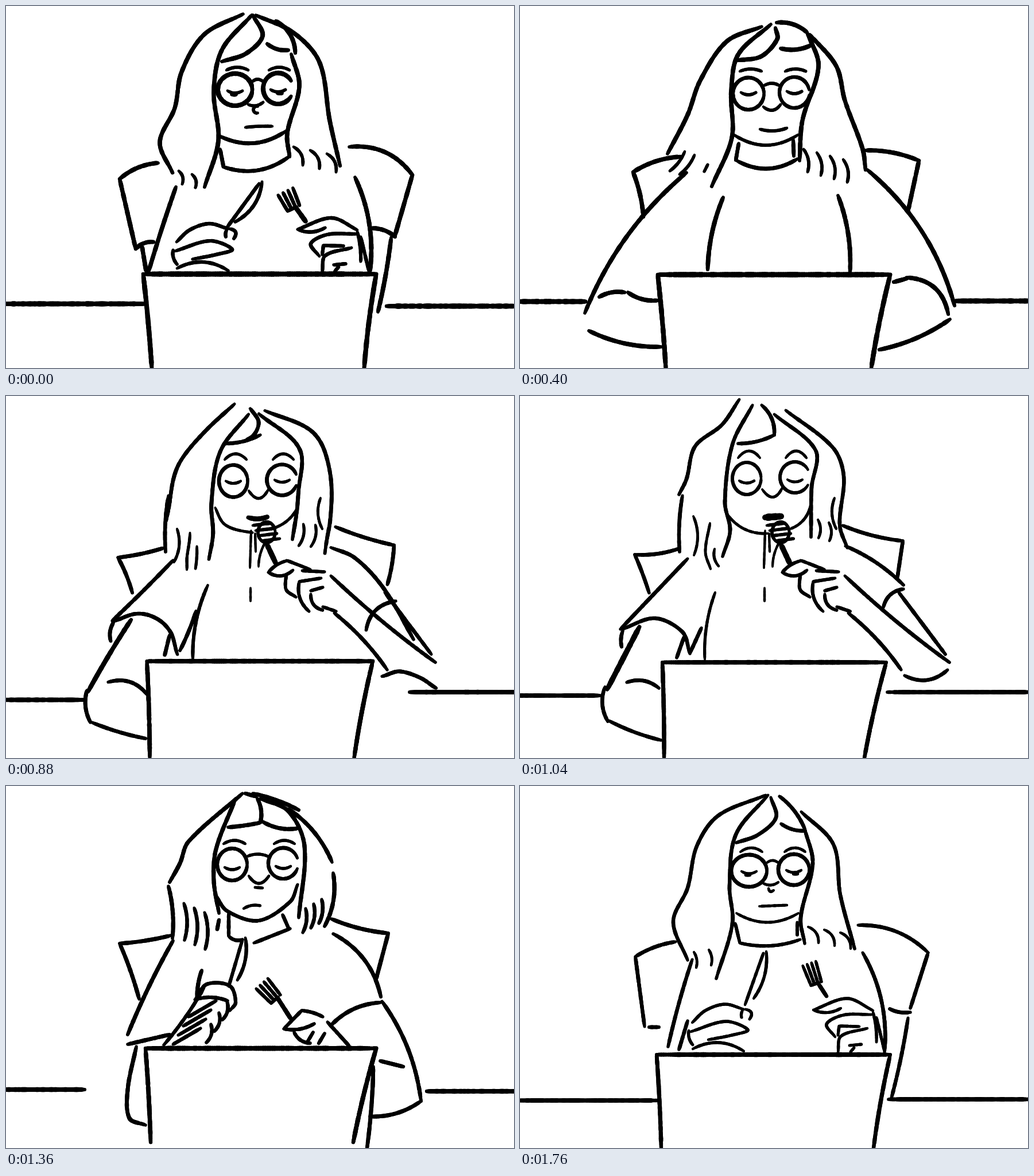
Animation of 885 by 632 pixels, one loop 1840 ms. Source, as an HTML page with a canvas:

```html
<!DOCTYPE html>
<html lang="en">
<head>
<meta charset="utf-8">
<title>Dinner at the laptop</title>
<style>
html, body { margin: 0; width: 100%; height: 100%; overflow: hidden; background: #fff; }
canvas { display: block; }
</style>
</head>
<body>
<canvas id="stage" width="885" height="632"></canvas>
<script>
const W = 885, H = 632, STEP = 80, STEPS = 23, SAMPLES = 100;
const ctx = document.getElementById('stage').getContext('2d');
const poses = [];
const mix = (a, b, k) => a + (b - a) * k;

// Smooth path through points, evenly paced; returns u in 0..1 -> [x, y].
function spline(v) {
  const p = [];
  for (let i = 0; i < v.length; i += 2) p.push([v[i], v[i + 1]]);
  const last = p.length - 1;
  const d = p.slice(1).map((q, i) => Math.hypot(q[0] - p[i][0], q[1] - p[i][1]));
  const total = d.reduce((a, b) => a + b, 0);
  const slope = (i, c) => {
    const a = Math.max(i - 1, 0), b = Math.min(i + 1, last);
    return (p[b][c] - p[a][c]) / ((i > 0 ? d[a] : 0) + (i < last ? d[i] : 0));
  };
  return u => {
    let i = 0, s = u * total;
    while (i < last - 1 && s > d[i]) s -= d[i++];
    const t = s / d[i], t2 = t * t, t3 = t2 * t;
    return [0, 1].map(c =>
      (2 * t3 - 3 * t2 + 1) * p[i][c] + (t3 - 2 * t2 + t) * d[i] * slope(i, c) +
      (3 * t2 - 2 * t3) * p[i + 1][c] + (t3 - t2) * d[i] * slope(i + 1, c));
  };
}

// One drawing: named strokes, so that equal names can blend between drawings.
class Sketch {
  constructor(step, pen) {
    Object.assign(this, { step, pen, width: pen, strokes: {} });
    poses.push(this);
  }
  weight(k) { this.width = this.pen * k; return this; }
  put(name, at) {
    const pts = Array.from({ length: SAMPLES + 1 }, (_, i) => at(i / SAMPLES));
    this.strokes[name] = { width: this.width, pts };
    return this;
  }
  curve(name, ...v) { return this.put(name, spline(v)); }

  // Positive bulge lies right-hand of the direction of travel.
  bow(name, x0, y0, x1, y1, bulge = 0) {
    const dx = x1 - x0, dy = y1 - y0, k = 4 * bulge / Math.hypot(dx, dy);
    return this.put(name, u => {
      const b = k * u * (1 - u);
      return [x0 + dx * u - dy * b, y0 + dy * u + dx * b];
    });
  }
  oval(name, x, y, rx, ry, gap = 0) {
    return this.put(name, u => {
      const a = (gap / 2 + (360 - gap) * u) * Math.PI / 180;
      return [x + rx * Math.cos(a), y + ry * Math.sin(a)];
    });
  }
  // A row of equal strokes: locks of hair, fingers.
  comb(name, count, x, y, dx, dy, lean, drop, bulge = 0) {
    for (let i = 0; i < count; i++) {
      const cx = x + i * dx, cy = y + i * dy;
      this.bow(name + i, cx, cy, cx + lean, cy + drop, bulge);
    }
    return this;
  }

  face({ y, lid, lx, rx, rl, rr, brow, arch, gap = 0, bridge = true, pupils = false, rim = 1 }) {
    this.weight(rim).oval('lensL', lx, y, rl, 28).oval('lensR', rx, y - 2, rr, 27, gap);
    this.weight(0.75);
    if (bridge) this.bow('bridge', lx + rl, y - 14, rx - rr, y - 14, -4);
    this.bow('browL', lx - 15, brow, lx + 23, brow, -arch);
    this.bow('browR', rx - 16, brow, rx + 20, brow, -arch);
    this.bow('eyeL', lx - 13, lid, lx + 13, lid, 4).bow('eyeR', rx - 13, lid - 2, rx + 13, lid - 2, 4);
    if (pupils) {
      this.weight(1.1).bow('pupilL', lx - 5, lid + 6, lx + 1, lid + 6).bow('pupilR', rx, lid + 4, rx + 6, lid + 4);
    }
    return this.weight(0.75);
  }
  neck(x, y, x0, y0, x1, y1, sag) {
    return this.weight(0.9).bow('neckL', x, y, x0, y0).bow('collar', x0, y0, x1, y1, sag);
  }
  chair(side, x0, y0, x1, y1, x2, y2, top = 0, edge = 0) {
    return this.weight(1).bow('chair' + side, x0, y0, x1, y1, top).bow('edge' + side, x1, y1, x2, y2, edge);
  }
  laptop(y, x0, x1, b0, b1, floor = H) {
    return this.weight(1.2).bow('lapTop', x0, y, x1, y).weight(1.1)
      .bow('lapL', x0, y, b0, floor, -1).bow('lapR', x1, y, b1, floor, 2).weight(1);
  }
  desk(x0, y0, x1, y1) {
    return this.weight(1.15).bow('deskL', -8, y0, x0, y0).bow('deskR', x1, y1, W + 8, y1).weight(1);
  }
  knife(hx, hy, tx, ty, belly) {
    return this.weight(0.85).bow('knife', hx, hy, tx, ty)
      .bow('blade', tx + 5, ty - 3, hx + 15, hy - 11, -belly);
  }
  fork(tx, ty, bx, by, hx, hy, gap) {
    const len = Math.hypot(bx - tx, by - ty);
    const nx = (by - ty) / len * gap, ny = (tx - bx) / len * gap;
    this.weight(0.85);
    for (let i = 0; i < 4; i++) {
      const k = i - 1.5;
      this.bow('tine' + i, tx + nx * k, ty + ny * k, bx + nx * k * 0.8, by + ny * k * 0.8);
    }
    this.bow('tineBase', bx - nx * 1.2, by - ny * 1.2, bx + nx * 0.6, by + ny * 0.6);
    return this.weight(1.1).bow('fork', bx + nx * 0.4, by + ny * 0.4, hx, hy);
  }
  // Both hands closed around the cutlery.
  grip(dx, dy) {
    const move = v => v.map((n, i) => n + (i % 2 ? dy : dx));
    const c = (name, ...v) => this.curve(name, ...move(v));
    const b = (name, bulge, ...v) => this.bow(name, ...move(v), bulge);
    this.weight(0.82);
    c('backL', 297,412, 320,391, 354,380, 387,389);
    b('thumbL', -7, 390,389, 397,406);
    b('nailL', 1, 384,392, 383,403);
    c('fingerL', 294,428, 356,410, 394,425, 366,434, 325,442);
    b('heelL', 3, 291,426, 298,451);
    b('palmL', -13, 298,458, 387,462);
    c('backR', 508,390, 567,370, 612,391);
    b('thumbR', 6, 508,390, 556,387);
    c('fingerR', 546,437, 531,415, 560,399, 610,398);
    b('knuckleR', 0, 553,418, 588,419);
    b('jointR', 0, 551,434, 553,418);
    c('palmR', 551,464, 556,436, 602,422);
    b('heelR', -2, 612,394, 618,446);
    b('wristLine', 0, 618,403, 632,462);
    b('ring', 0, 571,452, 592,450);
    b('ringEnd', 0, 573,463, 579,456);
    return this;
  }
}

new Sketch(0, 7.5)
  .curve('hairL', 413,14, 345,50, 306,115, 294,178, 268,238, 290,291)
  .curve('partL', 428,16, 376,77, 362,150, 370,235, 346,316)
  .curve('fringe', 430,16, 447,52, 418,83, 376,97).bow('fringeR', 455,66, 492,77, 4)
  .curve('hairR', 435,16, 500,46, 546,98, 564,200, 582,279).bow('partR', 470,26, 504,82, -9)
  .curve('faceR', 497,84, 511,140, 490,222, 494,263)
  .face({ y: 146, lid: 148, lx: 399, rx: 474, rl: 30, rr: 26, brow: 112, arch: 5, gap: 60, pupils: true, rim: 1.05 })
  .bow('nose', 422,172, 448,168, 4).oval('septum', 437, 181, 6, 6, 150).bow('mouth', 417,212, 464,210, -1)
  .comb('lockL', 2, 301, 288, 23, 6, 6, 23, -4).comb('lockR', 3, 501, 246, 29, 6, 16, 32, -6)
  .weight(0.9).bow('jaw', 372,227, 488,218, 17).neck(373, 250, 379, 281, 493, 263, 15)
  .chair('L', 265, 274, 198, 302, 226, 424, 6).chair('R', 598, 246, 708, 295, 677, 403, -17)
  .bow('armL', 296,316, 248,465, 1).bow('armR', 608,299, 634,465, -12)
  .bow('cuffL', 226,424, 257,412, -4).bow('cuffR', 678,403, 638,388, 4)
  .bow('foreL', 237,420, 244,462).bow('foreR', 671,404, 648,534, -2)
  .laptop(468, 239, 645, 254, 624).desk(244, 520, 663, 524)
  .grip(0, 0).knife(384, 388, 441, 310, 11).fork(487, 324, 501, 353, 522, 376, 9.5);

new Sketch(5, 7.5)
  .curve('hairL', 421,36, 360,62, 314,130, 292,190, 257,258)
  .curve('partL', 437,32, 380,85, 368,150, 369,230, 334,315)
  .curve('fringe', 445,38, 448,58, 420,88, 378,95).bow('fringeR', 454,74, 508,68, 5)
  .bow('partR', 447,29, 500,46, -6)
  .curve('faceR', 500,46, 520,105, 492,200, 487,270)
  .curve('hairR', 505,50, 551,105, 566,165, 597,250, 602,286)
  .face({ y: 153, lid: 151, lx: 398, rx: 478, rl: 27, rr: 26, brow: 114, arch: 4, gap: 20, rim: 0.85 })
  .bow('nose', 424,176, 454,172, 8).bow('mouth', 418,215, 465,213, 4).bow('jaw', 373,225, 484,225, 18)
  .comb('lockL', 2, 287, 254, 17, 6, -26, 34, -3).bow('wisp', 327,277, 321,289)
  .comb('lockR', 4, 494, 250, 23, 6, 7, 40, -5)
  .neck(381, 240, 376, 269, 483, 267, 16).bow('neckR', 476,234, 477,262)
  .chair('L', 282, 263, 197, 290, 215, 368, 6, -3).chair('R', 603, 252, 695, 270, 676, 358, -5)
  .bow('armL', 290,291, 113,536, 19).bow('armR', 605,286, 757,523, -22)
  .bow('torsoL', 354,334, 327,460, 6).bow('torsoR', 554,331, 575,463, -7)
  .bow('elbowL', 138,508, 182,500, -4).bow('wristL', 188,500, 240,514, 5).bow('underL', 120,567, 246,595, 8)
  .bow('wristR', 651,482, 673,476).bow('elbowR', 673,474, 746,538, -19).bow('underR', 749,547, 626,600, -7)
  .laptop(469, 240, 645, 254, 612).desk(114, 516, 758, 515);

new Sketch(9, 7)
  .bow('crown', 412,19, 428,23)
  .curve('hairL', 414,22, 345,70, 302,140, 283,195, 276,283)
  .curve('partL', 440,48, 377,105, 359,190, 354,290)
  .curve('fringe', 430,28, 446,58, 425,85, 390,89).bow('fringeR', 452,66, 497,79, 6)
  .curve('faceR', 438,30, 508,90, 509,190, 491,255)
  .curve('hairR', 439,26, 535,48, 563,120, 572,225, 541,284)
  .face({ y: 153, lid: 149, lx: 397, rx: 483, rl: 25, rr: 27, brow: 114, arch: 8, gap: 25 })
  .bow('nose', 424,168, 456,168, 13).bow('septum', 437,186, 444,186).bow('noseSide', 430,148, 427,160)
  .bow('mouth', 417,212, 456,212, 6).curve('jaw', 369,185, 378,220, 427,237).bow('jawR', 441,235, 507,204, 7)
  .comb('lockL', 4, 294, 254, 16, 2, -12, 48, -6).comb('lockR', 2, 517, 231, 23, -2, -17, 44, -5)
  .bow('shoulder', 358,255, 380,244).bow('nape', 484,240, 495,241)
  .neck(386, 230, 379, 255, 486, 252, 25).bow('neckR', 476,228, 480,246)
  .chair('L', 270, 265, 190, 287, 215, 343, 0, -3).chair('R', 586, 231, 685, 268, 672, 338, 1, -4)
  .bow('armL', 290,290, 195,378, -2).curve('armR', 565,267, 625,292, 690,375, 752,520)
  .curve('cuffL', 193,381, 235,370, 280,393, 301,452).bow('cuffR', 690,379, 622,448, 18)
  .bow('hemL', 195,382, 188,418, 5).bow('hemR', 675,345, 711,403, -3)
  .bow('torsoL', 363,318, 329,458, 9).bow('torsoR', 547,319, 556,456, -6)
  .bow('sleeveL', 346,346, 310,440, -3).bow('foldL', 284,415, 280,448).bow('sleeveR', 572,406, 623,451, 3)
  .bow('foreL', 228,378, 134,520, 3).bow('elbowL', 134,520, 141,571, 4).bow('underL', 145,573, 241,595, 2)
  .bow('wristL', 170,499, 250,533, -16).bow('wristR', 628,444, 655,476)
  .curve('elbowR', 640,491, 678,466, 725,490, 754,542).bow('underR', 750,540, 630,593, -9)
  .laptop(461, 243, 640, 250, 613).desk(131, 538, 766, 517);

new Sketch(13, 6.5)
  .curve('hairL', 382,6, 352,50, 305,88, 290,145, 277,172).bow('hairL2', 283,174, 278,272, 3)
  .curve('partL', 405,16, 370,85, 357,185, 366,235, 353,280)
  .bow('fringe', 421,16, 443,68, -7).bow('fringeEnd', 443,68, 380,83, -4)
  .curve('faceR', 443,32, 515,95, 508,160, 507,246)
  .curve('hairR', 463,25, 545,90, 564,140, 557,225, 570,265)
  .face({ y: 144, lid: 148, lx: 395, rx: 479, rl: 25, rr: 26, brow: 108, arch: 12, gap: 60, bridge: false, rim: 0.9 })
  .bow('nose', 422,163, 457,160, 15).bow('jaw', 360,205, 432,240, 11).bow('jawR', 471,232, 506,192, 7)
  .weight(1.8).bow('mouth', 427,212, 455,210)
  .weight(0.85).oval('bite', 454, 238, 15, 18).comb('bar', 4, 430, 226, 5, 9, 32, -4)
  .weight(1.4).bow('fork', 455,260, 470,292)
  .weight(0.65).bow('cloth', 427,235, 425,300).bow('clothSeam', 434,240, 435,272).bow('clothEdge', 452,255, 440,298, 3)
  .bow('button', 426,335, 426,358)
  .weight(0.75).bow('lockL0', 302,210, 303,278, -7).curve('lockL1', 331,222, 323,272, 332,302).bow('lockL2', 339,267, 346,297, 4)
  .comb('lockR', 2, 519, 216, 19, 5, 1, 32, -4).bow('lockR2', 548,178, 551,232, 6)
  .weight(0.9).bow('thumbTop', 457,308, 488,288, -3).bow('thumbLow', 457,308, 500,304, 8)
  .bow('index', 489,287, 530,303).bow('knuckle', 516,305, 555,307)
  .curve('finger0', 488,312, 488,338, 505,351).bow('finger1', 549,318, 511,324).bow('finger2', 511,324, 528,376, 8)
  .bow('finger3', 552,334, 531,340).bow('finger4', 531,346, 552,374, 7).bow('finger5', 552,368, 575,376)
  .chair('L', 278, 266, 200, 277, 225, 344, -4, -1).chair('R', 562, 226, 667, 253, 657, 320, 4)
  .bow('armL', 292,284, 175,407).bow('armR', 567,262, 668,330, -6)
  .curve('cuffL', 178,407, 235,388, 283,412, 296,450).bow('cuffR', 668,337, 633,369, 8)
  .bow('hemL', 179,410, 177,438, 2).bow('foldL', 286,420, 273,457).bow('sleeveL', 316,405, 296,449)
  .weight(0.8).bow('torsoL', 340,343, 322,460, 6)
  .weight(1.4).bow('foreL', 208,403, 152,512)
  .weight(1).bow('elbowL', 148,508, 153,568, 7).bow('underL', 155,567, 246,601, 3).bow('wristL', 186,500, 242,510, -8)
  .bow('foreR', 660,343, 741,451).bow('wristTop', 566,314, 748,465, 4).bow('wristLow', 572,379, 664,478, -5)
  .bow('elbowR', 670,488, 745,478, 13)
  .laptop(465, 248, 638, 251, 600).desk(140, 523, 640, 517);

new Sketch(17, 7)
  .bow('crown', 417,13, 435,18)
  .curve('hairL', 412,13, 318,97, 303,135, 285,168).bow('hairL2', 283,175, 290,266, -4)
  .curve('partL', 400,22, 366,110, 362,165, 371,222).bow('lock', 371,234, 368,250)
  .bow('fringe', 438,22, 443,64, -4).bow('fringeEnd', 443,64, 387,72, -1).bow('fringeR', 445,61, 508,74, 6)
  .bow('partR', 430,13, 510,42, -3)
  .curve('faceR', 443,22, 492,44, 520,105, 510,230)
  .bow('hairR', 492,40, 568,133, -9).bow('hairR2', 570,152, 555,245, -8)
  .face({ y: 137, lid: 142, lx: 394, rx: 483, rl: 26, rr: 26, brow: 101, arch: 6, gap: 40, rim: 0.9 })
  .bow('nose', 423,157, 458,157, 13).bow('septum', 434,177, 447,178).bow('mouth', 414,214, 443,209, -3)
  .weight(0.9).curve('jaw', 365,190, 385,218, 440,235, 495,202, 508,172)
  .comb('lockL', 3, 310, 205, 18, 8, 1, 64, -5).comb('lockR', 3, 522, 214, 14, -8, -5, 42, -4)
  .neck(388, 222, 388, 262, 412, 268, 4).bow('collarR', 432,274, 495,249).bow('neckR', 482,225, 493,250)
  .chair('L', 287, 261, 198, 275, 232, 372, -2, -2).chair('R', 567, 232, 666, 257, 644, 340, 4)
  .bow('armL', 291,270, 212,434, 3).bow('armR', 570,258, 653,368, -16)
  .bow('cuffL', 212,451, 285,434).bow('cuffR', 652,378, 567,417, 9)
  .curve('foreL', 227,455, 212,530, 215,580, 243,592).bow('foreR', 655,376, 723,550, -12)
  .bow('underR', 723,550, 634,577, -8).bow('wristR', 652,480, 692,490).bow('torsoL', 341,322, 333,368, 2)
  .knife(388, 350, 412, 268, 7).fork(446, 345, 470, 372, 496, 406, 9)
  .weight(0.9).curve('backL', 330,372, 350,346, 390,349, 400,378, 390,392).bow('heelL', 345,352, 275,452, -3)
  .bow('fingerL', 329,373, 386,375, -5)
  .comb('finger', 4, 366, 375, -9, 16, -48, 28).comb('hook', 3, 385, 376, -14, 20, -8, 32, -5)
  .bow('thumbTop', 484,424, 515,392).bow('index', 515,392, 552,403, -2).bow('thumbR', 484,424, 537,415, 5)
  .bow('fingerR', 502,430, 530,449, 5).comb('knuckleR', 2, 535, 430, 20, 2, -10, 17).bow('heelR', 560,412, 598,454)
  .laptop(458, 243, 645, 252, 605, 622).bow('lapEdge', 640,490, 629,H, -2).desk(137, 530, 733, 533);

new Sketch(19, 7)
  .curve('hairL', 425,18, 350,48, 320,115, 310,175, 292,225, 296,258)
  .curve('partL', 415,25, 366,95, 378,195, 367,243)
  .bow('fringe', 428,24, 446,65, -9).bow('fringeEnd', 446,65, 377,79, -5).bow('fringeR', 455,62, 498,62)
  .curve('faceR', 432,25, 505,65, 512,180, 518,236)
  .curve('hairR', 430,22, 490,28, 553,85, 570,170, 569,237)
  .face({ y: 138, lid: 140, lx: 393, rx: 484, rl: 24, rr: 28, brow: 98, arch: 6 })
  .bow('nose', 422,152, 453,148, 17).bow('noseSide', 426,135, 424,146).bow('mouth', 446,208, 471,209)
  .weight(0.9).bow('jaw', 381,205, 508,203, 31).bow('nape', 490,232, 512,230)
  .comb('lockL', 3, 317, 208, 17, -3, 4, 48, -4).comb('lockR', 2, 531, 160, 15, 22, -2, 72, -7)
  .neck(391, 224, 391, 256, 490, 242, 12).bow('neckR', 482,224, 490,244)
  .chair('L', 280, 265, 190, 285, 222, 403, 4, -8).chair('R', 595, 243, 683, 280, 658, 420, 2, 4)
  .bow('armL', 280,268, 214,430, -9).bow('armR', 565,240, 645,382, -16)
  .bow('cuffL', 214,430, 270,436, 1).bow('cuffR', 645,382, 595,384)
  .bow('foreL', 224,440, 229,592, 5).bow('foreR', 633,385, 660,580, -14).bow('underR', 660,583, 618,582, -5)
  .bow('torsoL', 354,324, 335,392, 2)
  .laptop(464, 244, 640, 235, 600).bow('lapEdge', 640,472, 630,H, -3).bow('lapFold', 640,480, 658,580)
  .desk(220, 515, 674, 517)
  .grip(-2, 8).knife(370, 388, 422, 275, 12).fork(494, 297, 498, 344, 520, 385, 12);

new Sketch(22, 6.5)
  .curve('hairL', 428,16, 345,52, 308,105, 292,178, 267,237, 292,304)
  .curve('partL', 432,16, 376,85, 365,175, 370,240, 342,336)
  .curve('fringe', 437,20, 446,55, 415,85, 377,99).bow('fringeR', 455,66, 497,78, 4)
  .bow('partR', 452,18, 496,75, -5).curve('faceR', 496,75, 510,135, 489,230, 496,275)
  .curve('hairR', 490,45, 546,102, 558,190, 583,284)
  .face({ y: 148, lid: 149, lx: 399, rx: 477, rl: 31, rr: 27, brow: 115, arch: 7, pupils: true })
  .bow('nose', 424,170, 450,168, 4).bow('septum', 433,179, 442,182, 4).bow('mouth', 417,210, 465,208)
  .bow('jaw', 377,222, 485,222, 16)
  .comb('lockL', 2, 303, 290, 26, -4, 4, 27, -3).comb('lockR', 3, 502, 246, 28, 5, 18, 28, -6)
  .neck(375, 240, 383, 274, 488, 268, 8).bow('neckR', 483,238, 483,260)
  .chair('L', 271, 272, 201, 298, 217, 420, 4).chair('R', 589, 243, 711, 291, 680, 388, -14)
  .bow('armL', 300,303, 258,455, 2).bow('armR', 597,291, 635,465, -14)
  .bow('cuffL', 225,421, 242,421).bow('cuffR', 680,395, 644,389, -3)
  .bow('foldL', 292,410, 277,460).bow('foreR', 676,405, 647,545, -2)
  .laptop(469, 238, 645, 246, 616).desk(243, 549, 642, 547)
  .grip(3, 1).knife(392, 382, 424, 292, 8).fork(504, 310, 516, 345, 534, 367, 8);

function blend(a, b, k) {
  if (!a || !b) return k < 0.5 ? a : b;
  return {
    width: mix(a.width, b.width, k),
    pts: a.pts.map((p, i) => [mix(p[0], b.pts[i][0], k), mix(p[1], b.pts[i][1], k)])
  };
}

// Rough brush: slightly tapered ends and seeded grain.
function brush({ width, pts }, seed) {
  const rand = () => (seed = (seed * 16807) % 2147483647) / 2147483647 - 0.5;
  let length = 0;
  for (let i = 1; i <= SAMPLES; i++) length += Math.hypot(pts[i][0] - pts[i - 1][0], pts[i][1] - pts[i - 1][1]);
  const stride = Math.max(1, Math.round(2.5 * SAMPLES / length));
  for (let i = 0; i < SAMPLES; i += stride) {
    const j = Math.min(i + stride, SAMPLES);
    const body = Math.min(1, Math.sin(Math.PI * (i + j) / 2 / SAMPLES) * 4);
    ctx.lineWidth = width * (0.8 + 0.2 * body + rand() * 0.16);
    ctx.beginPath();
    ctx.moveTo(...pts[i]);
    ctx.lineTo(...pts[j]);
    ctx.stroke();
  }
}

function draw(step) {
  const i = poses.findLastIndex(p => p.step <= step);
  const from = poses[i], to = poses[(i + 1) % poses.length];
  const k = (step - from.step) / ((to.step - from.step + STEPS) % STEPS);
  ctx.fillStyle = '#fff';
  ctx.fillRect(0, 0, W, H);
  ctx.strokeStyle = '#000';
  ctx.lineCap = 'round';
  let seed = step * 977 + 11;
  for (const name in { ...from.strokes, ...to.strokes }) {
    const stroke = blend(from.strokes[name], to.strokes[name], k);
    if (stroke) brush(stroke, seed += 131);
  }
}

const begin = performance.now();
let shown = -1;
function tick() {
  const step = Math.floor((performance.now() - begin) / STEP) % STEPS;
  if (step !== shown) draw(shown = step);
  requestAnimationFrame(tick);
}
tick();
</script>
</body>
</html>
```
